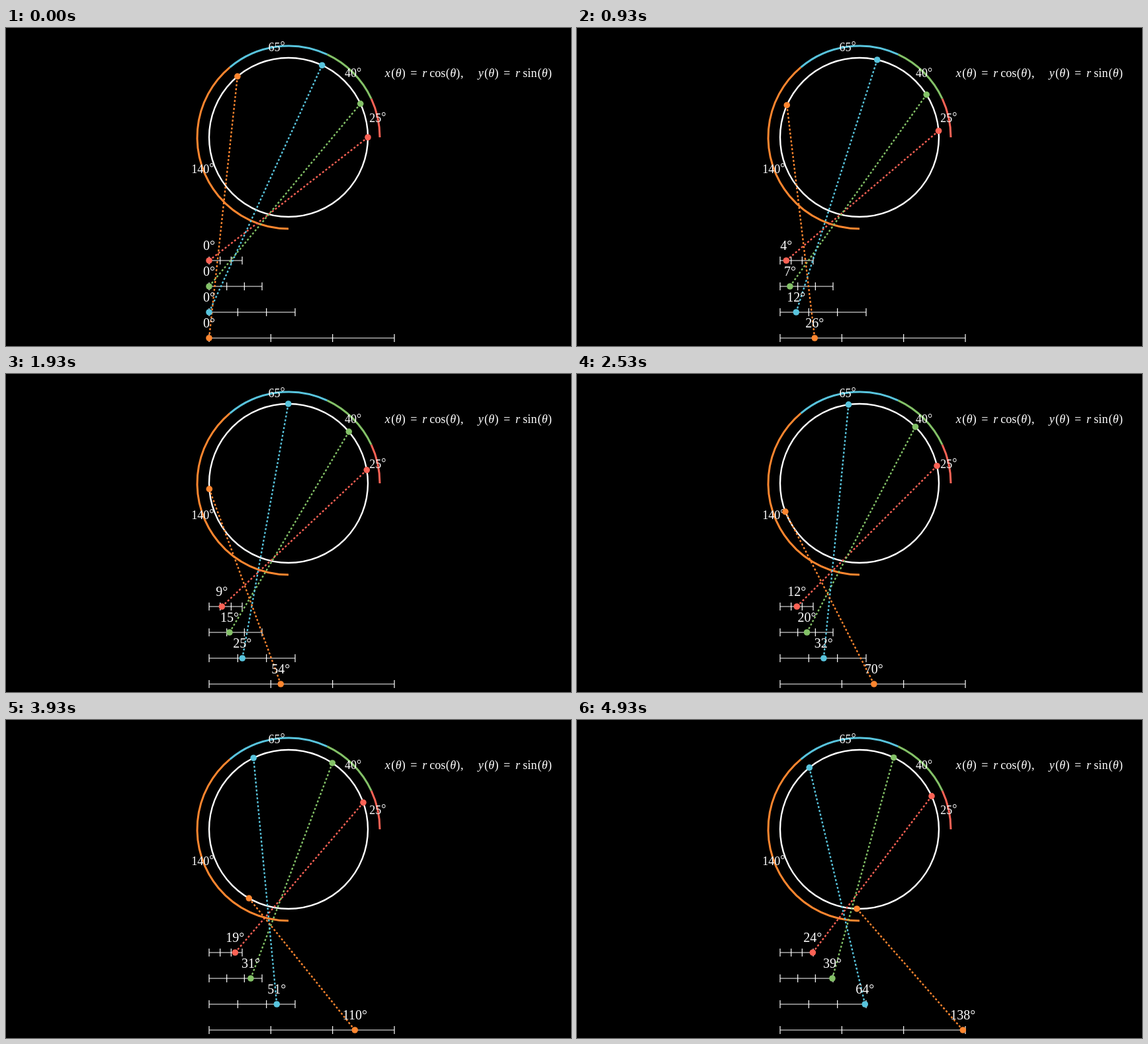
These frames come from a looping animation (854x480 px, 4.97 s). An HTML page with a canvas:

```html
<!DOCTYPE html>
<html lang="en">
<head>
<meta charset="utf-8">
<title>Arcs and number lines</title>
<style>
html, body { margin: 0; width: 100%; height: 100%; overflow: hidden; background: #000; }
canvas { display: block; }
</style>
</head>
<body>
<canvas id="stage" width="854" height="480"></canvas>
<script>
const ctx = document.getElementById('stage').getContext('2d');
const SERIF = '"Liberation Serif", Times, serif';
const LOOP = 4970, STEPS = 75, STEP_MS = 5000 / STEPS;
const CX = 427, CY = 165, R = 120, ARC_R = 138;
const LINE_X = 307, LINE_Y = 351, LINE_GAP = 39, PX_PER_DEG = 2;
const UNIT = 60;

const parts = [
  { span: 25, color: '#fc6255' },
  { span: 40, color: '#83c167' },
  { span: 65, color: '#58c4dd' },
  { span: 140, color: '#ff862f' }
];
parts.forEach((p, i) => {
  p.start = i ? parts[i - 1].start + parts[i - 1].span : 0;
  p.y = LINE_Y + i * LINE_GAP;
});

// [text, advance in em, italic]; empty text is a space
const theta = [['(', .389], ['θ', .469, true], [')', .389]];
const equals = [['', .278], ['=', .778], ['', .278], ['r', .479, true], ['', .167]];
const formula = [
  ['x', .572, true], ...theta, ...equals, ['cos', 1.338], ...theta,
  [',', .278], ['', 1.167],
  ['y', .526, true], ...theta, ...equals, ['sin', 1.228], ...theta
];

const polar = (deg, r) => {
  const a = deg * Math.PI / 180;
  return [CX + r * Math.cos(a), CY - r * Math.sin(a)];
};

function line(x1, y1, x2, y2) {
  ctx.beginPath();
  ctx.moveTo(x1, y1);
  ctx.lineTo(x2, y2);
  ctx.stroke();
}

function arc(from, to, r, color, width) {
  ctx.strokeStyle = color;
  ctx.lineWidth = width;
  ctx.beginPath();
  ctx.arc(CX, CY, r, -from * Math.PI / 180, -to * Math.PI / 180, true);
  ctx.stroke();
}

function dot(x, y, color) {
  ctx.fillStyle = color;
  ctx.beginPath();
  ctx.arc(x, y, 4.8, 0, Math.PI * 2);
  ctx.fill();
}

// Dashes and gaps are evened out so that both ends carry a dash
function dashed(x1, y1, x2, y2, color) {
  const len = Math.hypot(x2 - x1, y2 - y1);
  const n = Math.ceil(len / (UNIT * .05) / 2);
  ctx.strokeStyle = color;
  ctx.lineWidth = 2.4;
  ctx.setLineDash([len / 2 / n, len / 2 / (n - 1)]);
  line(x1, y1, x2, y2);
  ctx.setLineDash([]);
}

function degrees(value, x, baseline, size, raise) {
  ctx.font = `${size}px ${SERIF}`;
  ctx.fillStyle = '#fff';
  ctx.textAlign = 'left';
  const w = ctx.measureText(value).width;
  const left = x - (w + ctx.measureText('°').width) / 2;
  ctx.fillText(value, left, baseline);
  ctx.fillText('°', left + w, baseline - raise);
}

function drawFormula(x, baseline, em) {
  ctx.fillStyle = '#fff';
  ctx.textAlign = 'center';
  for (const [text, adv, italic] of formula) {
    ctx.font = `${italic ? 'italic ' : ''}${em}px ${SERIF}`;
    ctx.fillText(text, x + adv * em / 2, baseline);
    x += adv * em;
  }
}

function drawScale({ span, y }) {
  const w = span * PX_PER_DEG;
  ctx.strokeStyle = '#fff';
  ctx.lineWidth = 1.2;
  line(LINE_X, y, LINE_X + w, y);
  for (let i = 0; i <= 3; i++) {
    const x = LINE_X + w * i / 3;
    line(x, y - 6, x, y + 6);
  }
}

function draw(t) {
  const tick = Math.floor((t % LOOP) / 10) * 10;
  const progress = Math.floor((tick + 5) / STEP_MS) / STEPS;

  ctx.fillStyle = '#000';
  ctx.fillRect(0, 0, 854, 480);
  arc(0, 360, R, '#fff', 2.4);
  for (const p of parts) arc(p.start, p.start + p.span, ARC_R, p.color, 3);
  for (const p of parts) {
    const [x, y] = polar(p.start + p.span / 2, ARC_R);
    degrees(p.span, x, y + 6.8, 18, 1.5);
    drawScale(p);
  }
  drawFormula(571.5, 73.5, 18.07);

  const moving = parts.map(p => {
    const deg = p.span * progress;
    const [x, y] = polar(p.start + deg, R);
    return { ...p, deg, x, top: y, mark: LINE_X + deg * PX_PER_DEG };
  });
  for (const m of moving) dashed(m.x, m.top, m.mark, m.y, m.color);
  for (const m of moving) {
    dot(m.x, m.top, m.color);
    dot(m.mark, m.y, m.color);
  }
  for (const m of moving) degrees(Math.floor(m.deg + 1e-6), m.mark, m.y - 16.5, 20, 0);
}

const begin = performance.now();
function frame() {
  draw(performance.now() - begin);
  requestAnimationFrame(frame);
}
frame();
</script>
</body>
</html>
```
